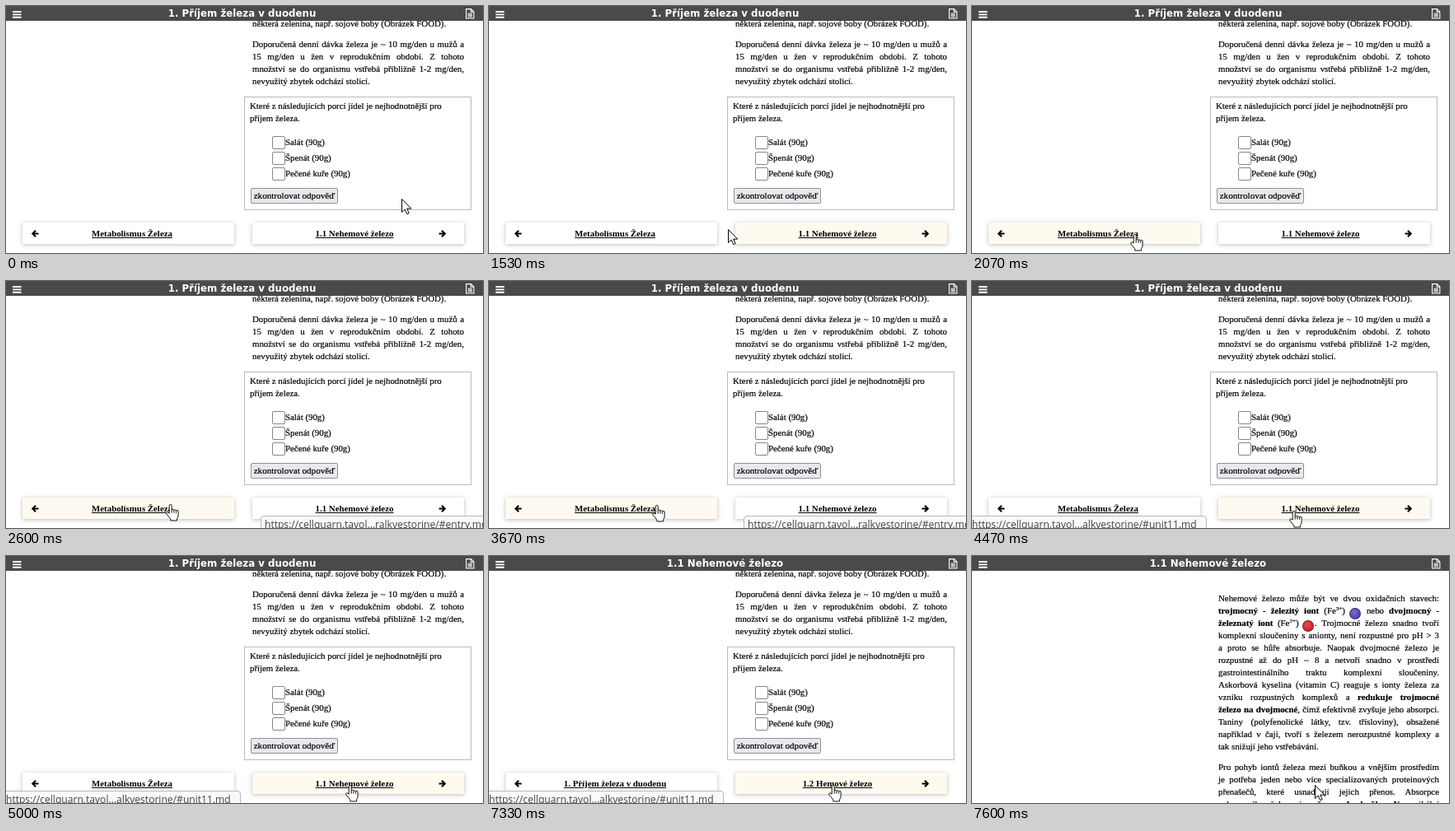
An HTML page that plays this animation: 579 by 300 pixels, repeating every 8 s.

```html
<!DOCTYPE html>
<html lang="cs">
<head>
<meta charset="utf-8">
<title>Železo</title>
<style>
html, body { margin: 0; width: 100%; height: 100%; overflow: hidden; background: #fff; }
#stage { position: relative; width: 579px; height: 300px; overflow: hidden; background: #fff;
  font: 10.85px/15px "Liberation Serif", serif; color: #000; white-space: nowrap; }
#stage div, #stage svg { position: absolute; box-sizing: border-box; }
.full { inset: 0; }
#stage .line { height: 15px; -webkit-text-stroke: .2px #000; }
.just { text-align-last: justify; }
sup { font-size: 7px; line-height: 0; vertical-align: 4px; }
.ball { display: inline-block; width: 14px; height: 14px; margin: -4px 0; border-radius: 50%;
  vertical-align: 0; position: relative; top: 3px; left: -1px; box-sizing: border-box; border: 1px solid #0006; }
.quiz { left: 289px; top: 110px; width: 276px; height: 138px; border: 1px solid #bbb; }
.check { left: 323px; width: 16px; height: 16px; border: 1px solid #85858f; border-radius: 2px; }
.button { left: 297px; top: 221px; width: 106px; height: 19px; border: 1px solid #8f8f9d; border-radius: 2px;
  background: #e9e9ed; font-size: 11.1px; line-height: 17px; text-align: center; -webkit-text-stroke: .2px #000; }
.card { top: 263px; width: 257px; height: 26px; background: #fff;
  box-shadow: 0 1px 4px #00000029, 0 1px 7px #0000001f; }
.card.hover { background: #fffaf0; }
.card div { top: 6px; width: 200px; text-align: center; font-weight: bold; text-decoration: underline; }
.card svg { top: 9px; }
#bar { left: 0; top: 0; width: 579px; height: 18px; background: #4a4a4a; color: #fff; }
#title { left: 0; top: 0; width: 573px; text-align: center; font: bold 11.8px/19px "DejaVu Sans", sans-serif; }
.status { top: 285px; height: 22px; font: 12.1px/20px "Open Sans", sans-serif; color: #444;
  background: #f9f9fb; border: 1px solid #b8b8bc; }
#statusLeft { left: -1px; width: 286px; border-radius: 0 4px 0 0; }
#statusRight { left: 309px; width: 290px; padding-left: 4px; border-radius: 4px 0 0 0; }
#stage svg { overflow: visible; }
</style>
</head>
<body>
<div id="stage">
  <div id="pageA" class="full">
    <div class="quiz"></div>
    <div class="button">zkontrolovat odpověď</div>
    <div id="prev" class="card" style="left:20px">
      <svg style="left:11px" width="9" height="9"><path d="M8.5 4.5H1.5M5 .8L1.3 4.5L5 8.2" fill="none" stroke="#000" stroke-width="2.1"/></svg>
      <div id="prevText" style="left:33px"></div>
    </div>
    <div id="next" class="card" style="left:299px">
      <div id="nextText" style="left:24px"></div>
      <svg style="left:226px" width="9" height="9"><path d="M.5 4.5H7.5M4 .8L7.7 4.5L4 8.2" fill="none" stroke="#000" stroke-width="2.1"/></svg>
    </div>
  </div>
  <div id="pageB" class="full"></div>
  <div id="bar">
    <svg style="left:8px;top:5.5px" width="11" height="10"><path d="M0 1H10.5M0 4.4H10.5M0 7.8H10.5" stroke="#fff" stroke-width="1.9"/></svg>
    <div id="title"></div>
    <svg style="left:558px;top:3px" width="11" height="13"><path d="M.6 .6H6.5L9.9 4V12H.6ZM6.3 .8V4.2H9.8M2.6 6.2H7.9M2.6 8.1H7.9M2.6 10H7.9" fill="none" stroke="#fff" stroke-width="1.1"/></svg>
  </div>
  <div id="statusLeft" class="status">https://cellquarn.tavol...alkvestorine/#unit11.md</div>
  <div id="statusRight" class="status">https://cellquarn.tavol...ralkvestorine/#entry.md</div>
  <svg id="cursor" width="1" height="1" fill="#fff" stroke="#000" stroke-linejoin="round">
    <path id="arrow" d="M.5 .5V16.5L4.2 13L6.8 18.7L9.2 17.7L6.7 12.1H11.8Z"/>
    <path id="hand" transform="translate(-4 0) scale(.93)" d="M4.5 12V2A1.6 1.6 0 0 1 7.7 2V8A1.5 1.5 0 0 1 10.7 8.3A1.5 1.5 0 0 1 13.5 8.9A1.4 1.4 0 0 1 16.2 9.7V15Q16.2 17 14.6 19V21.5H6.3V19.5L.9 12.8Q.1 11 1.8 10.6Q3 10.6 4.5 12ZM7.7 8V11.5M10.7 8.3V11.5M13.5 9V11.5"/>
  </svg>
</div>
<script>
const $ = id => document.getElementById(id);
const DURATION = 8000, TICK = 200 / 3;

function addLine(page, html, left, top, width) {
  const line = document.createElement('div');
  line.className = width ? 'line just' : 'line';
  line.style.cssText = `left:${left}px;top:${top}px;` + (width ? `width:${width}px` : '');
  line.innerHTML = html;
  page.append(line);
}

// Every line but the last is justified.
function addParagraph(page, text, left, top, width) {
  const lines = text.split('\n');
  lines.forEach((html, i) => addLine(page, html, left, top + i * 15, i < lines.length - 1 ? width : 0));
}

const ball = color => `<span class="ball" style="background:radial-gradient(circle at 40% 35%,${color})"></span>`;

addParagraph($('pageA'), 'některá zelenina, např. sojové boby (Obrázek FOOD).', 299, 14, 257);
addParagraph($('pageA'), `Doporučená denní dávka železa je ~ 10 mg/den u mužů a
15 mg/den u žen v reprodukčním období. Z tohoto
množství se do organismu vstřebá přibližně 1-2 mg/den,
nevyužitý zbytek odchází stolicí.`, 299, 39, 257);
addLine($('pageA'), 'Které z následujících porcí jídel je nejhodnotnější pro', 296, 114);
addLine($('pageA'), 'příjem železa.', 296, 129);
['Salát (90g)', 'Špenát (90g)', 'Pečené kuře (90g)'].forEach((label, i) => {
  const box = document.createElement('div');
  box.className = 'check';
  box.style.top = 158 + i * 19 + 'px';
  $('pageA').append(box);
  addLine($('pageA'), label, 339, 158 + i * 19);
});

addParagraph($('pageB'), `Nehemové železo může být ve dvou oxidačních stavech:
<b>trojmocný - železitý iont</b> (Fe<sup>3+</sup>) ${ball('#7d68d0,#4a32a0')} nebo <b>dvojmocný -</b>
<b>železnatý iont</b> (Fe<sup>2+</sup>) ${ball('#e84a4a,#b81c1c')}. Trojmocné železo snadno tvoří
komplexní sloučeniny s anionty, není rozpustné pro pH &gt; 3
a proto se hůře absorbuje. Naopak dvojmocné železo je
rozpustné až do pH ~ 8 a netvoří snadno v prostředí
gastrointestinálního traktu komplexní sloučeniny.
Askorbová kyselina (vitamin C) reaguje s ionty železa za
vzniku rozpustných komplexů a <b>redukuje trojmocné</b>
<b>železo na dvojmocné</b>, čímž efektivně zvyšuje jeho absorpci.
Taniny (polyfenolické látky, tzv. třísloviny), obsažené
například v čaji, tvoří s železem nerozpustné komplexy a
tak snižují jeho vstřebávání.`, 299, 44, 268);
addParagraph($('pageB'), `Pro pohyb iontů železa mezi buňkou a vnějším prostředím
je potřeba jeden nebo více specializovaných proteinových
přenašečů, které usnadňují jejich přenos. Absorpce
nehemového železa je <b>přenos do buňky</b>. Na apikální
`, 299, 249, 268);

// Pointer path: time, x, y
const path = [
  [0, 480, 234], [1133, 480, 234], [1200, 470, 238], [1333, 400, 257], [1467, 318, 268], [1533, 290, 271],
  [1733, 226, 280], [2000, 196, 277], [2067, 196, 277], [2333, 197, 273], [2600, 198, 271],
  [3600, 198, 271], [3667, 202, 272], [3867, 236, 277], [4133, 296, 280], [4333, 355, 281], [4467, 389, 279],
  [4533, 393, 279], [4733, 408, 280], [5000, 416, 278], [8000, 416, 278]
];

function pointerAt(t) {
  const i = Math.max(1, path.findIndex(p => p[0] >= t));
  const [t0, x0, y0] = path[i - 1], [t1, x1, y1] = path[i];
  const k = (t - t0) / (t1 - t0);
  return [x0 + (x1 - x0) * k, y0 + (y1 - y0) * k].map(Math.round);
}

const within = (t, from, to) => t >= from - 5 && t < to - 5;
const show = (id, on) => $(id).style.visibility = on ? 'visible' : 'hidden';
function setText(id, text) {
  if ($(id).textContent !== text) $(id).textContent = text;
}

function render(time) {
  const t = Math.floor((time % DURATION + 5) / TICK) * TICK;
  const moved = t >= 7325, loaded = t >= 7395;
  const [x, y] = pointerAt(t);
  const hand = within(t, 1933, 3733) || within(t, 4400, 7600);
  $('cursor').style.transform = `translate(${x}px,${y}px)`;
  show('hand', hand);
  show('arrow', !hand);
  show('pageA', !loaded);
  show('pageB', loaded);
  show('statusRight', within(t, 2200, 4400));
  show('statusLeft', within(t, 4400, 7533));
  $('prev').classList.toggle('hover', within(t, 1600, 4067));
  $('next').classList.toggle('hover', within(t, 1467, 1600) || within(t, 4200, DURATION));
  setText('title', moved ? '1.1 Nehemové železo' : '1. Příjem železa v duodenu');
  setText('prevText', moved ? '1. Příjem železa v duodenu' : 'Metabolismus Železa');
  setText('nextText', moved ? '1.2 Hemové železo' : '1.1 Nehemové železo');
}

const start = performance.now();
function frame() {
  render(performance.now() - start);
  requestAnimationFrame(frame);
}
frame();
</script>
</body>
</html>
```
